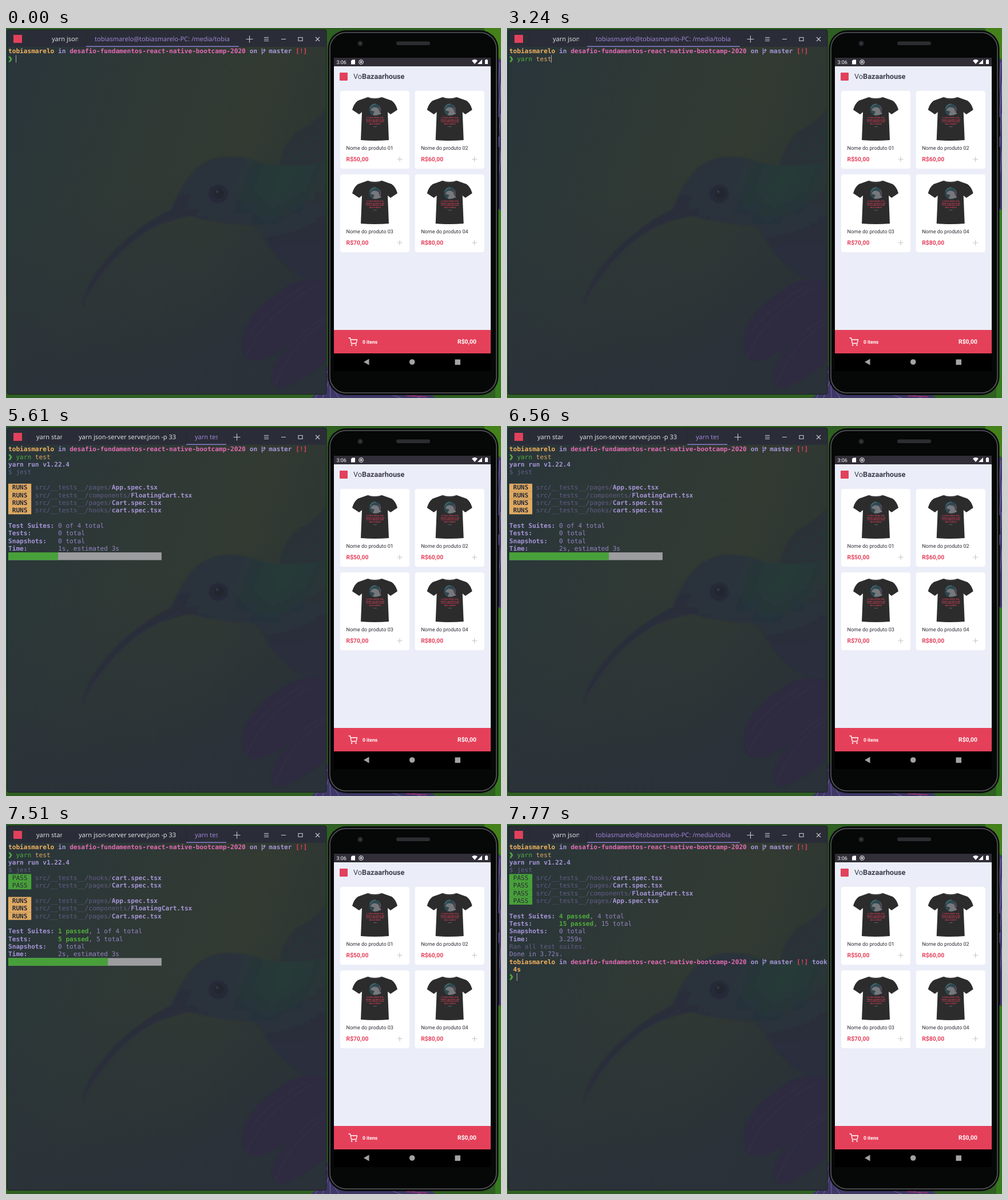
Write an HTML page that moves like this. It is 865 px wide and 647 px high and loops after 8000 ms.

```html
<!DOCTYPE html>
<html lang="pt">
<head>
<meta charset="utf-8">
<title>Terminal and shop app</title>
<style>
html, body { margin: 0; width: 100%; height: 100%; overflow: hidden; background: #2f5f20; }
#stage { display: block; width: 865px; height: 647px; text-rendering: geometricPrecision; }
text { white-space: pre; }
#term text { font: 11.12px "DejaVu Sans Mono", "DejaVu Sans", monospace; }
#term .b { font-weight: 700; }
.norm { fill: #9384c0; } .head { fill: #a695d6; } .dim { fill: #625d85; }
.name { fill: #f2b25f; } .dir { fill: #e36bb4; } .green { fill: #50ab3c; }
.red { fill: #e2415c; } .amber { fill: #e0aa62; } .ink { fill: #282a36; }
#term .arrow { fill: #50ab3c; stroke: #50ab3c; stroke-width: 1.1; font-size: 12px; }
#tabs text { font: 11px "Noto Sans", "Open Sans", sans-serif; fill: #dfe0e4; }
#tabs .on { fill: #a084d6; }
#phone text { font-family: Roboto, Arial, sans-serif; }
.bold { font-weight: 700; }
.line { fill: none; stroke: #c9cad2; stroke-width: 1.1; }
</style>
</head>
<body>
<svg id="stage" viewBox="0 0 865 647" xmlns="http://www.w3.org/2000/svg">
  <defs>
    <linearGradient id="glass" x2="1" y2=".35">
      <stop offset="0" stop-color="#29353b"/><stop offset=".45" stop-color="#2f3935"/>
      <stop offset=".75" stop-color="#323a32"/><stop offset="1" stop-color="#2e3633"/>
    </linearGradient>
    <linearGradient id="dusk" x2=".3" y2="1">
      <stop offset=".5" stop-color="#29303a" stop-opacity="0"/><stop offset="1" stop-color="#29303a" stop-opacity=".8"/>
    </linearGradient>
    <linearGradient id="body" x1="0" y1="0" x2="1" y2=".35">
      <stop offset="0" stop-color="#292e3c"/><stop offset=".45" stop-color="#29343a"/>
      <stop offset=".7" stop-color="#273b38"/><stop offset="1" stop-color="#2a323a"/>
    </linearGradient>
    <linearGradient id="belly" x2="0" y2="1">
      <stop offset=".25" stop-color="#2a2d3c" stop-opacity="0"/><stop offset=".7" stop-color="#2a2d3c"/>
    </linearGradient>
    <filter id="soft"><feGaussianBlur stdDeviation="1"/></filter>
    <clipPath id="pane"><rect x="2" y="3" width="558" height="637" rx="3"/></clipPath>
    <g id="card">
      <rect width="121" height="136" rx="4" fill="#fff"/>
      <path fill="#2c2c2d" d="M48 11Q60 15 73 11L90 17Q97 22 100 33L88 41L83 37L85 86Q60 88 36 86L38 37L33 41L21 33Q24 22 31 17Z"/>
      <path d="M49 11.500Q60 18 72 11.500" fill="none" stroke="#444446"/>
      <circle cx="61" cy="33" r="10.500" fill="#304850"/>
      <path fill="#77787c" d="M53 34Q56 27 63 29Q68 30 68 35L72 40Q63 44 57 42L60 36Z"/>
      <path d="M52 30Q55 23 62 23" fill="none" stroke="#426f76" stroke-width="1.500"/>
      <path d="M68 27Q72 33 69 38" fill="none" stroke="#73475f" stroke-width="1.300"/>
      <g class="bold" font-size="3.600" fill="#e5405a" text-anchor="middle">
        <text x="61" y="48">A VIDA PEDE SOL</text><text x="61" y="51.700">MAR CALMO E AR</text>
        <text x="61" y="55.400">LUA CHEIA E PAZ</text><text x="61" y="59">BOA SORTE</text>
      </g>
      <text x="61" y="63" font-size="2.200" fill="#bbb" text-anchor="middle">sempre</text>
      <path d="M99.500 119.500h9M104 115v9" stroke="#c8c8ce" stroke-width="1.200"/>
    </g>
  </defs>

  <!-- Desktop -->
  <rect width="865" height="647" fill="#2f5f22"/>
  <path fill="#245247" d="M0 0H3V420L0 480Z"/>
  <path fill="#44811a" d="M835 0H865V56L858 48Z"/>
  <path fill="#453d70" d="M855 55H865V318H855Z"/>
  <path d="M863 60L858 140M865 95L859 180M864 150L859 230M865 215L859 290" stroke="#7a6da0" fill="none"/>
  <path fill="#377b20" d="M855 318H865V647H855Z"/>
  <path fill="#3e3866" d="M533 647L545 637L561 590L572 620L600 640H742L750 647Z"/>
  <path d="M541 647L562 600M553 647L566 612M567 647L566 620M582 647L570 628M690 647L668 639M725 647L705 640" fill="none" stroke="#7061a0"/>
  <path d="M700 643L735 645" stroke="#8f326c" stroke-width="2"/>

  <!-- Terminal window -->
  <g clip-path="url(#pane)">
    <rect x="2" y="3" width="558" height="638" fill="url(#glass)"/>
    <rect x="2" y="3" width="558" height="638" fill="url(#dusk)"/>
    <g filter="url(#soft)">
      <path fill="#2b3037" d="M478 240Q482 208 510 180Q538 168 562 140V250Z"/>
      <path d="M486 235Q505 200 560 185M497 238Q520 212 560 205M510 240Q530 224 560 222" fill="none" stroke="#283638" stroke-width="3"/>
      <g id="bird">
        <path fill="url(#body)" d="M288 320Q303 280 326 253Q350 227 385 225Q418 225 445 236Q505 248 562 232V458Q515 440 490 415Q462 391 450 365Q440 350 431 345Q375 343 318 328Q303 332 288 320Z"/>
        <path fill="url(#belly)" d="M288 320Q303 280 326 253Q350 227 385 225Q418 225 445 236Q505 248 562 232V458Q515 440 490 415Q462 391 450 365Q440 350 431 345Q375 343 318 328Z"/>
        <path fill="#292d3b" d="M133 488Q139 447 178 402Q225 349 289 317Q307 315 319 329Q265 339 225 370Q166 418 133 488Z"/>
        <path d="M137 478Q178 405 245 358Q275 337 305 325" fill="none" stroke="#333745"/>
        <ellipse cx="371" cy="290" rx="17" ry="16" fill="#272c37"/>
        <circle cx="372" cy="289" r="9" fill="#21252f"/>
        <circle cx="369" cy="286" r="2" fill="#3d424c"/>
      </g>
      <path fill="#2d2c40" d="M562 445Q510 432 481 460Q437 487 421 519Q406 555 420 576Q434 588 463 574Q488 562 511 542Q467 577 464 610Q466 634 487 629Q526 613 562 580Z"/>
      <path d="M420 575Q450 500 545 450M470 625Q495 555 562 510M428 531Q457 490 522 451M511 542Q530 520 560 505" fill="none" stroke="#37364b"/>
    </g>
    <rect x="2" y="3" width="558" height="30" fill="#2a2d37"/>
  </g>
  <rect x="2" y="3" width="558" height="637.500" rx="3" fill="none" stroke="#1b1e24"/>
  <rect x="13" y="12" width="15" height="14" fill="#e2415c"/>
  <path class="line" d="M451 16.500h8M451 19.500h8M451 22.500h8M481 19.500h8M511 16.500h7v6h-7zM541 16l7 7M548 16l-7 7"/>
  <g id="tabs"></g>
  <g id="term"></g>

  <!-- Phone -->
  <g id="phone">
    <rect x="858" y="156" width="4" height="34" rx="1" fill="#17181a"/>
    <rect x="858" y="208" width="4" height="108" rx="1" fill="#17181a"/>
    <rect x="562.500" y="4" width="298" height="638" rx="32" fill="#0b0c0d"/>
    <rect x="566" y="8" width="291" height="630" rx="28" fill="#060707" stroke="#57595c" stroke-width="1.600"/>
    <circle cx="619" cy="27" r="4.500" fill="#25272a"/><circle cx="619" cy="27" r="2" fill="#393b3f"/>
    <rect x="682" y="23.500" width="59" height="6.500" rx="3" fill="#2c2d30"/>
    <rect x="573" y="52" width="274" height="517" fill="#ebeef8"/>
    <rect x="573" y="52" width="274" height="15" fill="#312e38"/>
    <text x="577.500" y="62.800" font-size="9" fill="#fff">3:06</text>
    <path fill="#fff" d="M605 55.500h5v8h-7v-6zM814 57Q819 53 824 57L819 63ZM832 55v8h-8zM837 56h1v-1h3v1h1v7h-5z"/>
    <circle cx="620.500" cy="59.500" r="3.700" fill="none" stroke="#e4e4e8" stroke-width="1.200"/>
    <circle cx="620.500" cy="59.500" r="1.800" fill="#e4e4e8"/>
    <rect x="583" y="78" width="14" height="14" rx="1" fill="#e2415c"/>
    <text x="607" y="89.300" font-size="12.700" fill="#3d3d4d">Vo<tspan class="bold">Bazaarhouse</tspan></text>
    <g id="shop"></g>
    <rect x="573" y="528" width="274" height="41" fill="#e5405a"/>
    <path d="M598.500 542h3l2 9.500h8.500l1.500-6.500h-11" fill="none" stroke="#fff" stroke-width="1.300" stroke-linejoin="round"/>
    <circle cx="604" cy="554.500" r="1.200" fill="#fff"/><circle cx="611.500" cy="554.500" r="1.200" fill="#fff"/>
    <g class="bold" fill="#fff">
      <text x="623" y="551.800" font-size="8.600">0 itens</text>
      <text x="789" y="552.300" font-size="10.400">R$0,00</text>
    </g>
    <rect x="573" y="569" width="274" height="31" fill="#000"/>
    <path fill="#a3a3a3" d="M625 584l9.500-5.500v11zM784.500 579.500h9.500v9.500h-9.500z"/>
    <circle cx="709.700" cy="584" r="4.800" fill="#a3a3a3"/>
  </g>
</svg>
<script>
const $ = id => document.getElementById(id);
const COL = 6.696, ROW = 13.35, LEFT = 4, TOP = 34.1;
const USER = 'tobiasmarelo';
let out = '';

$('shop').innerHTML = [1, 2, 3, 4].map((n, i) => {
  const x = 584 + i % 2 * 130.7, y = 110 + (i >> 1) * 146;
  return `<g transform="translate(${x} ${y})"><use href="#card"/>
    <text x="10.500" y="103" font-size="9" fill="#2d2d38">Nome do produto 0${n}</text>
    <text class="bold" x="10.500" y="123.200" font-size="10.400" fill="#e5405a">R$${40 + n * 10},00</text></g>`;
}).join('');

// Terminal drawing on a character grid
const px = col => LEFT + col * COL;
const py = row => TOP + row * ROW;
function put(row, col, cls, text) {
  out += `<text class="${cls}" x="${px(col)}" y="${py(row) + 10.3}">${text}</text>`;
}
function block(row, col, cols, fill) {
  out += `<rect x="${px(col)}" y="${py(row)}" width="${cols * COL}" height="${ROW + .1}" fill="${fill}"/>`;
}
function cursor(row, col) {
  out += `<rect x="${Math.floor(px(col))}" y="${py(row)}" width="1" height="13.3" fill="#a4a5b2"/>`;
}
function prompt(row, took) {
  put(row, 0, 'b name', USER);
  put(row, 13, 'b head', 'in');
  put(row, 16, 'b dir', 'desafio-fundamentos-react-native-bootcamp-2020');
  put(row, 63, 'b head', 'on');
  const x = px(66), y = py(row);
  out += `<path d="M${x + 1.5} ${y + 1.5}v11M${x + 1.5} ${y + 9}q5 0 4-4M${x + 3} ${y + 5.5}l2.500-2.500 2 2.500" fill="none" stroke="#a695d6" stroke-width="1.300"/>`;
  put(row, 68, 'b head', 'master');
  put(row, 75, 'b red', '[!]');
  if (took) {
    put(row, 79, 'b head', 'took');
    put(++row, 1, 'b name', '4s');
  }
  put(row + 1, 0, 'arrow', '❯');
}
function typed() {
  prompt(0);
  put(1, 2, 'green', 'yarn');
  put(1, 7, 'amber', 'test');
}
function started() {
  typed();
  put(2, 0, 'b head', 'yarn run v1.22.4');
  put(3, 0, 'dim', '$ jest');
}

const APP = ['pages/', 'App.spec.tsx'], FLOAT = ['components/', 'FloatingCart.tsx'],
      CART = ['pages/', 'Cart.spec.tsx'], HOOK = ['hooks/', 'cart.spec.tsx'];
function suite(row, label, [dir, file]) {
  const pass = label === 'PASS', path = 'src/__tests__/' + dir;
  block(row, 0, 6, pass ? '#48a03a' : '#e0aa62');
  put(row, 1, pass ? 'ink' : 'b ink', label);
  put(row, 7, 'dim', path);
  put(row, 7 + path.length, 'b head', file);
}
function summary(row, suites, tests, time) {
  const values = [suites, tests, [0, '0 total'], [0, time]];
  ['Test Suites:', 'Tests:', 'Snapshots:', 'Time:'].forEach((label, i) => {
    const [passed, rest] = values[i], good = passed ? passed + ' passed' : '';
    put(row + i, 0, 'b head', label);
    if (good) put(row + i, 13, 'b green', good);
    put(row + i, 13 + good.length, 'norm', rest);
  });
}
function progress({ pass = [], runs = [], suites = [0, '0 of 4 total'], tests = [0, '0 total'], secs = 0, blink = false }) {
  started();
  let row = 4;
  pass.forEach(s => suite(row++, 'PASS', s));
  row++;
  runs.forEach(s => suite(row++, 'RUNS', s));
  row++;
  summary(row, suites, tests, secs + 's, estimated 3s');
  block(row + 4, 0, 40, '#9d9da0');
  block(row + 4, 0, secs * 13, '#48a03a');
  if (blink) cursor(row + 4, 40);
}
function finished() {
  started();
  [HOOK, CART, FLOAT, APP].forEach((s, i) => suite(4 + i, 'PASS', s));
  summary(9, [4, ', 4 total'], [15, ', 15 total'], '3.259s');
  put(13, 0, 'dim', 'Ran all test suites.');
  put(14, 0, 'norm', 'Done in 3.72s.');
}

// Tab bar: label entries are [x, visible width, text]
function drawTabs(labels, from, to, plus) {
  const names = labels.map(([x, w, text], i) =>
    `<svg x="${x}" y="8" width="${w}" height="22"><text class="${i === labels.length - 1 ? 'on' : ''}" y="15">${text}</text></svg>`);
  $('tabs').innerHTML = names.join('') +
    `<path d="M39.500 5v26M${from - .5} 5v26" stroke="#252831"/>
     <path d="M${from} 32.300H${to}" stroke="#8d7bd0" stroke-width="1.500"/>
     <path class="line" d="M${plus - 6} 19.500h12M${plus} 13.500v12"/>`;
}
const idleTabs = () => drawTabs([[80, 46, 'yarn json-server'],
  [155, 238, `${USER}@${USER}-PC: /media/tobia`]], 140, 407, 425.5);
const busyTabs = () => drawTabs([[53, 45, 'yarn start'],
  [127, 180, 'yarn json-server server.json -p 33'], [330, 40, 'yarn tes']], 315, 385, 403.5);

function suggestion(count, blink) {
  prompt(0);
  put(1, 2, count < 4 ? 'red' : 'green', 'yarn'.slice(0, count));
  if (count < 4) put(1, 2 + count, 'dim', 'yarn'.slice(count));
  put(1, 7, 'dim', 'test');
  if (blink) cursor(1, 2 + count);
}
const allRuns = [APP, FLOAT, CART, HOOK];
const onePassed = { suites: [1, ', 1 of 4 total'], tests: [5, ', 5 total'], runs: [APP, FLOAT, CART], secs: 2 };
const steps = [
  [0, () => { prompt(0); cursor(1, 2); }],
  [950, () => suggestion(1, true)],
  [1390, () => suggestion(4, true)],
  [1960, () => suggestion(4, false)],
  [2550, () => suggestion(4, true)],
  [3240, () => { typed(); cursor(1, 11); }],
  [3940, () => { typed(); cursor(2, 0); }],
  [4070, () => { started(); cursor(4, 0); }],
  [4480, () => progress({})],
  [4570, () => progress({ runs: allRuns, blink: true })],
  [5070, () => progress({ runs: allRuns })],
  [5610, () => progress({ runs: allRuns, secs: 1 })],
  [6560, () => progress({ runs: allRuns, secs: 2 })],
  [7200, () => progress({ runs: allRuns, secs: 2, blink: true })],
  [7400, () => progress({ ...onePassed, pass: [HOOK] })],
  [7510, () => progress({ ...onePassed, pass: [HOOK, CART] })],
  [7600, () => progress({ pass: [HOOK, CART, FLOAT], runs: [APP], secs: 2,
    suites: [3, ', 3 of 4 total'], tests: [10, ', 10 total'] })],
  [7650, finished],
  [7710, () => { finished(); cursor(15, 0); }],
  [7770, () => { finished(); prompt(15, true); cursor(17, 2); }]
];

let shown = -1;
function tick() {
  const t = performance.now() % 8000;
  const now = steps.findLastIndex(([at]) => t >= at);
  if (now !== shown) {
    shown = now;
    const [at, draw] = steps[now];
    out = '';
    draw();
    $('term').innerHTML = out;
    at >= 3940 && at < 7770 ? busyTabs() : idleTabs();
  }
  requestAnimationFrame(tick);
}
tick();
</script>
</body>
</html>
```
